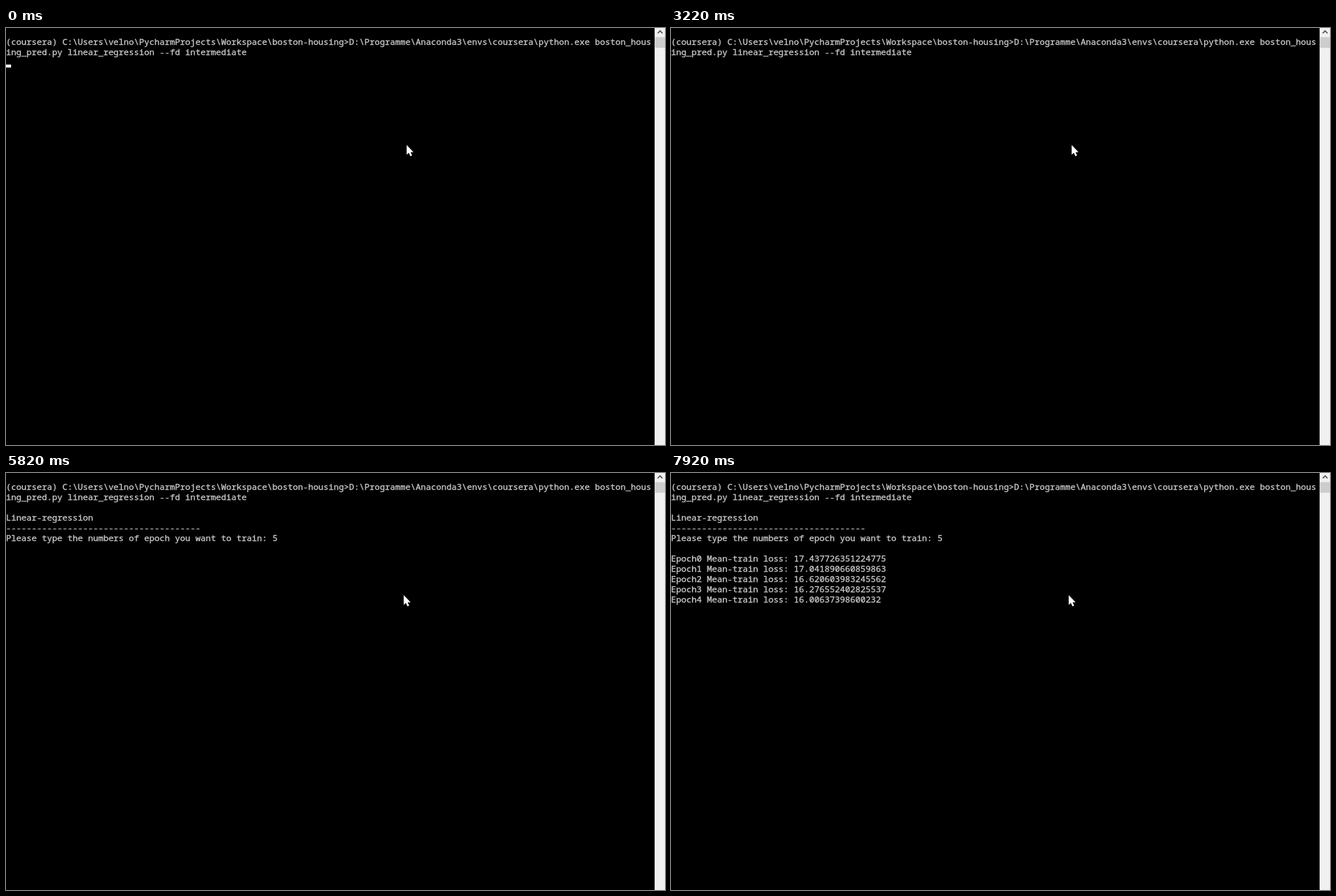
An HTML page that plays this animation: 900x570 px, repeating every 8 s.

```html
<!DOCTYPE html>
<html lang="en">
<head>
<meta charset="utf-8">
<title>Terminal session</title>
<style>
  html, body { margin: 0; width: 100%; height: 100%; overflow: hidden; background: #000; }
  svg { display: block; }
  text {
    font: 11.667px "Noto Sans Mono", "DejaVu Sans Mono", monospace;
    fill: #ccc; stroke: #ccc; stroke-width: .3px; white-space: pre;
  }
</style>
</head>
<body>
<svg width="900" height="570" viewBox="0 0 900 570">
  <rect width="900" height="570"/>
  <g id="lines"></g>
  <rect id="caret" width="7" height="4" fill="#fff"/>
  <rect x="885.8" width="14.2" height="570" fill="#f0f0f0"/>
  <rect x="886.5" y="12.5" width="13.5" height="14.5" fill="#cdcdcd"/>
  <path d="M890 7.2L893.3 3.9L896.6 7.2" fill="none" stroke="#505050" stroke-width="1.5"/>
  <path id="pointer" d="M0 0V13.2L2.9 10.5L5.1 15.3L7.4 14.2L5.3 9.7H9.4Z" fill="#fff"/>
</svg>
<script>
const LOOP = 8000, CELL_W = 7, CELL_H = 14, TOP = 12;
const PROMPT_AT = 3650, POINTER_MOVE_AT = 4730, KEY_AT = 5570, RESULT_AT = 5940;
const question = 'Please type the numbers of epoch you want to train: ';
const losses = ['17.437726351224775', '17.041890660859863', '16.620603983245562',
                '16.276552402825537', '16.00637398600232'];

// Each line: row, text, time it appears, column
const script = [
  [0, String.raw`(coursera) C:\Users\velno\PycharmProjects\Workspace\boston-housing>D:\Programme\Anaconda3\envs\coursera\python.exe boston_hous`, 0],
  [1, 'ing_pred.py linear_regression --fd intermediate', 0],
  [3, 'Linear-regression', PROMPT_AT],
  [4, '-'.repeat(38), PROMPT_AT],
  [5, question, PROMPT_AT],
  [5, '5', KEY_AT, question.length],
  ...losses.map((loss, i) => [7 + i, `Epoch${i} Mean-train loss: ${loss}`, RESULT_AT])
];

// Periods in which the caret is lit: start, end, row, column
const blinks = [
  [0, 150, 2, 0], [550, 1080, 2, 0], [1610, 2130, 2, 0], [2690, 3220, 2, 0],
  [4210, 4730, 5, question.length], [5290, KEY_AT, 5, question.length],
  [KEY_AT, 5820, 5, question.length + 1],
  [RESULT_AT, 6870, 12, 0], [7460, 7920, 12, 0]
];

const $ = id => document.getElementById(id);
const show = (node, visible) => node.setAttribute('visibility', visible ? 'visible' : 'hidden');
const place = (node, x, y) => node.setAttribute('transform', `translate(${x} ${y})`);

const lines = script.map(([row, content, start, column = 0]) => {
  const node = document.createElementNS('http://www.w3.org/2000/svg', 'text');
  node.textContent = content;
  place(node, column * CELL_W, TOP + row * CELL_H + 11);
  $('lines').append(node);
  return { node, start };
});

function draw(t) {
  lines.forEach(({ node, start }) => show(node, t >= start));
  const lit = blinks.find(([start, end]) => t >= start && t < end);
  show($('caret'), lit);
  if (lit) place($('caret'), lit[3] * CELL_W, TOP + lit[2] * CELL_H + 10);
  if (t < POINTER_MOVE_AT) place($('pointer'), 547.2, 160);
  else place($('pointer'), 543.2, 167);
}

const origin = performance.now();
function tick() {
  draw((performance.now() - origin) % LOOP);
  requestAnimationFrame(tick);
}
tick();
</script>
</body>
</html>
```
